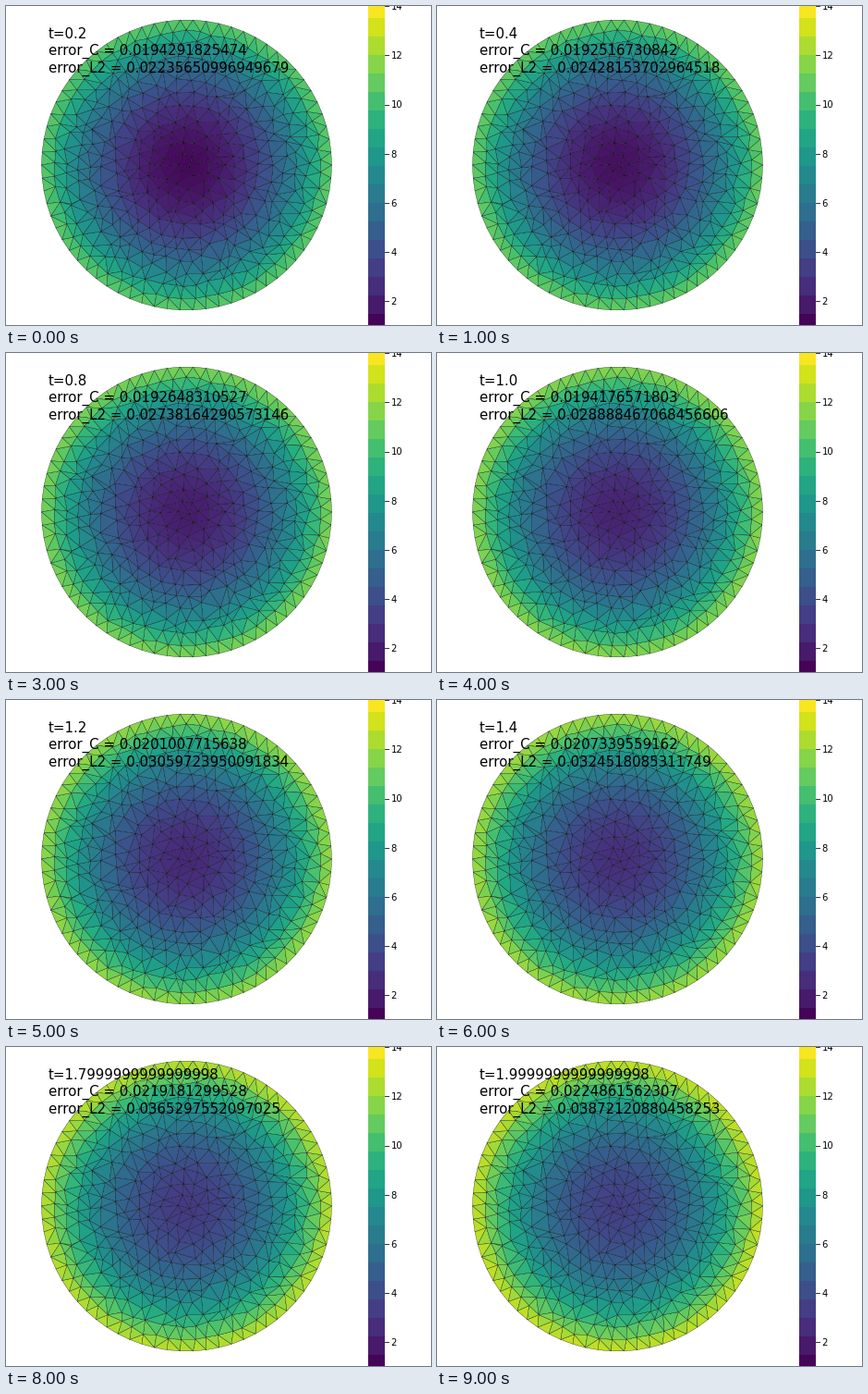
Recreate the animation shown at these times as a matplotlib script. Size 460 by 345 pixels, loop 10 s.

```python
import numpy as np
import matplotlib.pyplot as plt
from matplotlib.animation import FuncAnimation
from matplotlib.patches import Rectangle
from matplotlib.tri import Triangulation

W, H, DPI = 460, 345, 80
PT = 72 / DPI  # points per pixel
CX, CY, R = 195.5, 172, 157
VMIN, VMAX, BAND = 1, 14, 0.75
STEPS = 10

ERR_C = ["0.0194291825474", "0.0192516730842", "0.0192170956998",
         "0.0192648310527", "0.0194176571803", "0.0201007715638",
         "0.0207339559162", "0.0213417260385", "0.0219181299528",
         "0.0224861562307"]
ERR_L2 = ["0.02235650996949679", "0.02428153702964518",
          "0.025946709168199085", "0.02738164290573146",
          "0.028888467068456606", "0.03059723950091834",
          "0.0324518085311749", "0.03445172608413952",
          "0.0365297552097025", "0.03872120880458253"]

plt.rcParams["font.family"] = "DejaVu Sans"
fig = plt.figure(figsize=(W / DPI, H / DPI), dpi=DPI, facecolor="white")
ax = fig.add_axes([0, 0, 1, 1])
viridis = plt.get_cmap("viridis")


def make_mesh(rings=12, edge=70):
    """Disc mesh from jittered rings of points."""
    rng = np.random.default_rng(11)
    a = 2 * np.pi * np.arange(edge) / edge
    pts = [np.column_stack([R * np.cos(a), R * np.sin(a)])]
    for k in range(rings):
        r = R * k / rings
        n = max(1, round(2 * np.pi * r / 14))
        a = 2 * np.pi * (np.arange(n) + rng.random()) / n
        jitter = rng.normal(0, 1.2 if k == rings - 1 else 2.4, (n, 2))
        pts.append(np.column_stack([r * np.cos(a), r * np.sin(a)]) + jitter)
    x, y = np.vstack(pts).T
    return Triangulation(x, y)


mesh = make_mesh()
r2 = (mesh.x ** 2 + mesh.y ** 2) / R ** 2
face_r2 = r2[mesh.triangles].mean(axis=1)
disc_mesh = Triangulation(mesh.x + CX, mesh.y + CY, mesh.triangles)
disc = ax.tripcolor(disc_mesh, facecolors=face_r2, cmap=viridis,
                    vmin=VMIN, vmax=VMAX, edgecolors="black",
                    linewidth=0.3 * PT, antialiased=True)


def bar_y(v):
    return 372.5 - 26.6 * v


for low in np.arange(BAND, VMAX, BAND):
    top, bottom = bar_y(low + BAND), bar_y(low)
    color = viridis((low + BAND / 2 - VMIN) / (VMAX - VMIN))
    ax.add_patch(Rectangle((392, top), 18, bottom - top, fc=color,
                           lw=0, antialiased=False))
for v in range(2, 15, 2):
    y = bar_y(v)
    ax.plot([410, 413.5], [y, y], color="k", lw=0.8 * PT)
    ax.text(416.5, y, str(v), size=10 * PT, va="center_baseline")

lines = [ax.text(45.5, y, "", size=15 * PT, va="baseline", zorder=5)
         for y in (35, 53, 72)]

times = [0.2]
while len(times) < STEPS:
    times.append(times[-1] + 0.2)


def draw(i):
    t = times[i]
    disc.set_array(1 + 1.2 * t + 9.8 * face_r2)
    lines[0].set_text(f"t={t}")
    lines[1].set_text(f"error_C = {ERR_C[i]}")
    lines[2].set_text(f"error_L2 = {ERR_L2[i]}")
    return [disc, *lines]


ax.set_xlim(0, W)
ax.set_ylim(H, 0)
ax.axis("off")
anim = FuncAnimation(fig, draw, frames=STEPS, interval=1000, repeat=True)
plt.show()
```
